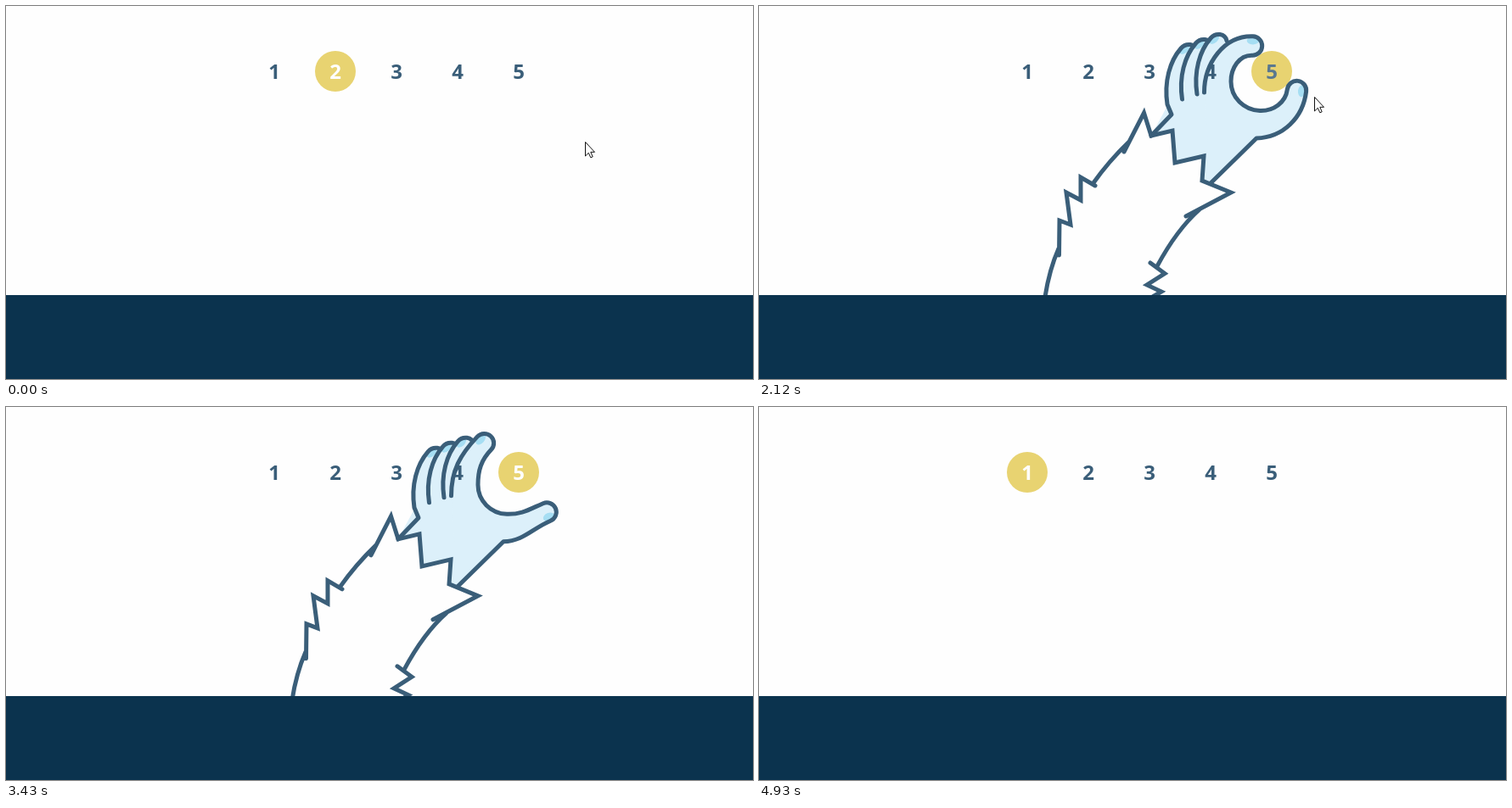
These frames come from a looping animation (880 by 440 pixels, 5110 ms). An HTML page with a canvas:

```html
<!DOCTYPE html>
<html lang="en">
<head>
<meta charset="utf-8">
<title>Pagination</title>
<style>
  html, body { margin: 0; width: 100%; height: 100%; overflow: hidden; background: #fefefe; }
  canvas { display: block; width: 880px; height: 440px; }
</style>
</head>
<body>
<canvas id="stage" width="880" height="440"></canvas>
<script>
const ctx = document.getElementById('stage').getContext('2d');
const LOOP = 5110, FLOOR = 341, DROP = 313, PAGES = 5, PAGE_Y = 77, BALL = 24;
const BG = '#fefefe', NAVY = '#0b334e', LINE = '#3a5e79';
const SKIN = '#dcf0fa', NAIL = '#a6def3', GOLD = '#e8d371';

const pageX = n => 316 + (n - 1) * 72;
const moves = [
  { at: 1030, from: 2, to: 5 },
  { at: 3150, from: 5, to: 1 }
];

const clamp = v => Math.min(1, Math.max(0, v));
const mix = (a, b, k) => a + (b - a) * k;
const span = (t, start, length) => clamp((t - start) / length);
const inOut = p => p < .5 ? 2 * p * p : 1 - 2 * (1 - p) ** 2;

// Arm geometry is laid out with the ball at the last page.
const CUFF = '462 153 487 147 490 185 524 177 522 206';
const FUR = new Path2D(`M337 343 Q342 311 353 286 M353.5 294 L354 253 367 258 362 220 379 229 379 202 396 212
  M393 210 Q412 183 436 160 M430 172 L453.5 126 ${CUFF} 556 220 503 248
  M519 240 Q492 264 469 307 M461 303 L478 315.500 457 329 474 337 457 347`);

// A finger's outline, starting at the foot of its left edge.
const finger = (x, y) => `${x} ${y} C${x - 4} ${y - 27} ${x + 3} ${y - 51} ${x + 16} ${y - 66}
  C${x + 22} ${y - 73} ${x + 33} ${y - 72} ${x + 35} ${y - 63}`;
const fingers = [0, 1, 2].map(i => {
  const x = 481 + 17.5 * i, y = 116 - 6 * i;
  const path = new Path2D((i ? 'M' : 'M462 153 L486 128 ') + finger(x, y));
  return { path, nail: { x: x + 20, y: y - 65, turn: -.75 } };
});
const PALM = new Path2D(`M${CUFF} 532 209 586 156 553 100 545 60 532 50 ${''}`
  .replace('M462 153 ', 'M487 147 L').replace('487 147 L487 147', '487 147 L') + ' L497 50 Q476 75 481 116 L486 128 462 153 Z');

// Fingertip centres and pointing directions in degrees.
const CLOSED = { thumb: [633.5, 99.5, -83], index: [581.5, 47, 2] };
const OPEN = { thumb: [637, 120.5, -25], index: [564, 40, -45] };

const rad = deg => deg * Math.PI / 180;
const step = (p, deg, d) => ({ x: p.x + d * Math.cos(rad(deg)), y: p.y + d * Math.sin(rad(deg)) });

function pose(name, k) {
  const [x, y, dir] = CLOSED[name].map((v, i) => mix(v, OPEN[name][i], k));
  return { x, y, dir };
}

// Joins points by near-circular arcs, each leaving and arriving along its own direction.
function curve(path, points) {
  points.slice(1).forEach((b, i) => {
    const a = points[i], d = .39 * Math.hypot(b.x - a.x, b.y - a.y);
    const p = step(a, a.dir, d), q = step(b, b.dir, -d);
    path.bezierCurveTo(p.x, p.y, q.x, q.y, b.x, b.y);
  });
}

function pinch(thumb, index) {
  const path = new Path2D(), r = 11.2;
  const side = (tip, turn, dir) => ({ ...step(tip, tip.dir + turn, r), dir: tip.dir + dir });
  const tipArc = tip => path.arc(tip.x, tip.y, r, rad(tip.dir + 90), rad(tip.dir - 90), true);
  path.moveTo(532, 209);
  path.lineTo(586, 156);
  curve(path, [{ x: 586, y: 156, dir: -2 }, side(thumb, 90, 0)]);
  tipArc(thumb);
  curve(path, [side(thumb, -90, 180), { x: 590, y: 123.5, dir: 182 }, { x: 556, y: 89, dir: -90 }, side(index, 90, 0)]);
  tipArc(index);
  curve(path, [side(index, -90, 180), { x: 524.5, y: 102, dir: 90 }]);
  return path;
}

function skin(path, nails) {
  ctx.fillStyle = SKIN;
  ctx.fill(path);
  ctx.save();
  ctx.clip(path);
  ctx.fillStyle = NAIL;
  for (const { x, y, turn } of nails) {
    ctx.beginPath();
    ctx.ellipse(x, y, 7, 4.5, turn, 0, 7);
    ctx.fill();
  }
  ctx.restore();
  ctx.stroke(path);
}

function drawArm(x, sunk, open) {
  ctx.save();
  ctx.translate(x - pageX(PAGES), sunk);
  ctx.strokeStyle = LINE;
  ctx.lineWidth = 5;
  ctx.lineCap = ctx.lineJoin = 'round';
  ctx.fillStyle = SKIN;
  ctx.fill(PALM);
  for (const f of fingers) skin(f.path, [f.nail]);
  const thumb = pose('thumb', open), index = pose('index', open);
  const nail = (tip, turn) => ({ ...step(tip, tip.dir + turn, 6), turn: rad(tip.dir) });
  skin(pinch(thumb, index), [nail(thumb, 90), nail(index, -90)]);
  ctx.lineJoin = 'miter';
  ctx.miterLimit = 3;
  ctx.stroke(FUR);
  ctx.restore();
}

const ARROW = new Path2D('M.5.5 V17 L4.3 13.3 6.8 18.8 9.2 17.8 6.8 12.3 H11.5 Z');
const HAND = new Path2D();
for (let i = 0; i < 4; i++) HAND.roundRect(3 * i - .5, i ? 5.5 + i : .5, 2.5, 12, 1.2);
HAND.roundRect(-1, 11, 12, 8, 3);
HAND.roundRect(1, 15, 8, 8, 1);
HAND.ellipse(-2, 14, 2, 5, -.7, 0, 7);

// Time and place of the pointer's turns.
const trail = [
  [30, 682, 160], [550, 629, 91], [800, 609, 79], [1040, 609, 79],
  [1450, 655, 114], [2120, 655, 107], [2640, 307, 100], [2980, 314, 83]
];

function drawCursor(t) {
  if (t >= moves[1].at) return;
  let [, x, y] = trail[0];
  trail.slice(1).forEach(([end, x1, y1], i) => {
    const k = span(t, trail[i][0], end - trail[i][0]);
    x = mix(x, x1, k);
    y = mix(y, y1, k);
  });
  const page = clamp((x - pageX(1)) / (pageX(PAGES) - pageX(1))) * (PAGES - 1) + 1;
  const over = Math.max(Math.abs(x - pageX(Math.round(page))), Math.abs(y - PAGE_Y)) <= BALL;
  ctx.save();
  ctx.translate(Math.round(x), Math.round(y));
  ctx.strokeStyle = '#111';
  ctx.fillStyle = '#fff';
  if (over) {
    ctx.lineWidth = 2;
    ctx.stroke(HAND);
    ctx.fill(HAND);
    ctx.fillStyle = '#111';
    for (let i = 1; i < 4; i++) ctx.fillRect(3 * i - 1, 7 + i, 1, 4);
  } else {
    ctx.fill(ARROW);
    ctx.stroke(ARROW);
  }
  ctx.restore();
}

function drawLabels(glow) {
  ctx.font = '700 24px "Open Sans", "Noto Sans", sans-serif';
  ctx.textAlign = 'center';
  for (let n = 1; n <= PAGES; n++) {
    const k = glow[n] || 0;
    ctx.fillStyle = `rgb(${mix(58, 254, k)}, ${mix(94, 254, k)}, ${mix(121, 254, k)})`;
    ctx.fillText(n, pageX(n), 86);
  }
}

function draw(t) {
  ctx.fillStyle = BG;
  ctx.fillRect(0, 0, 880, 440);

  let x = pageX(2), arm = null;
  const glow = { 2: 1 };
  for (const { at, from, to } of moves) {
    const s = t - at;
    if (s < 0) continue;
    x = mix(pageX(from), pageX(to), inOut(span(s, 541, 550)));
    glow[from] = 1 - span(s, 530, 200);
    glow[to] = span(s, 1050, 250);
    const rise = (1 - span(s, 0, 355)) ** 3;
    const sink = span(s, 1279, 486) ** 2;
    const shut = inOut(span(s, 220, 345)) - inOut(span(s, 1090, 180));
    arm = s < 1765 ? { sunk: DROP * (rise + sink), open: 1.1 * (1 - shut) } : null;
  }

  ctx.fillStyle = GOLD;
  ctx.beginPath();
  ctx.arc(x, PAGE_Y, BALL, 0, 7);
  ctx.fill();
  if (arm) drawArm(x, arm.sunk, arm.open);
  drawLabels(glow);
  ctx.fillStyle = NAVY;
  ctx.fillRect(0, FLOOR, 880, 440 - FLOOR);
  drawCursor(t);
}

const start = performance.now();
function tick() {
  draw((performance.now() - start) % LOOP);
  requestAnimationFrame(tick);
}
tick();
</script>
</body>
</html>
```
